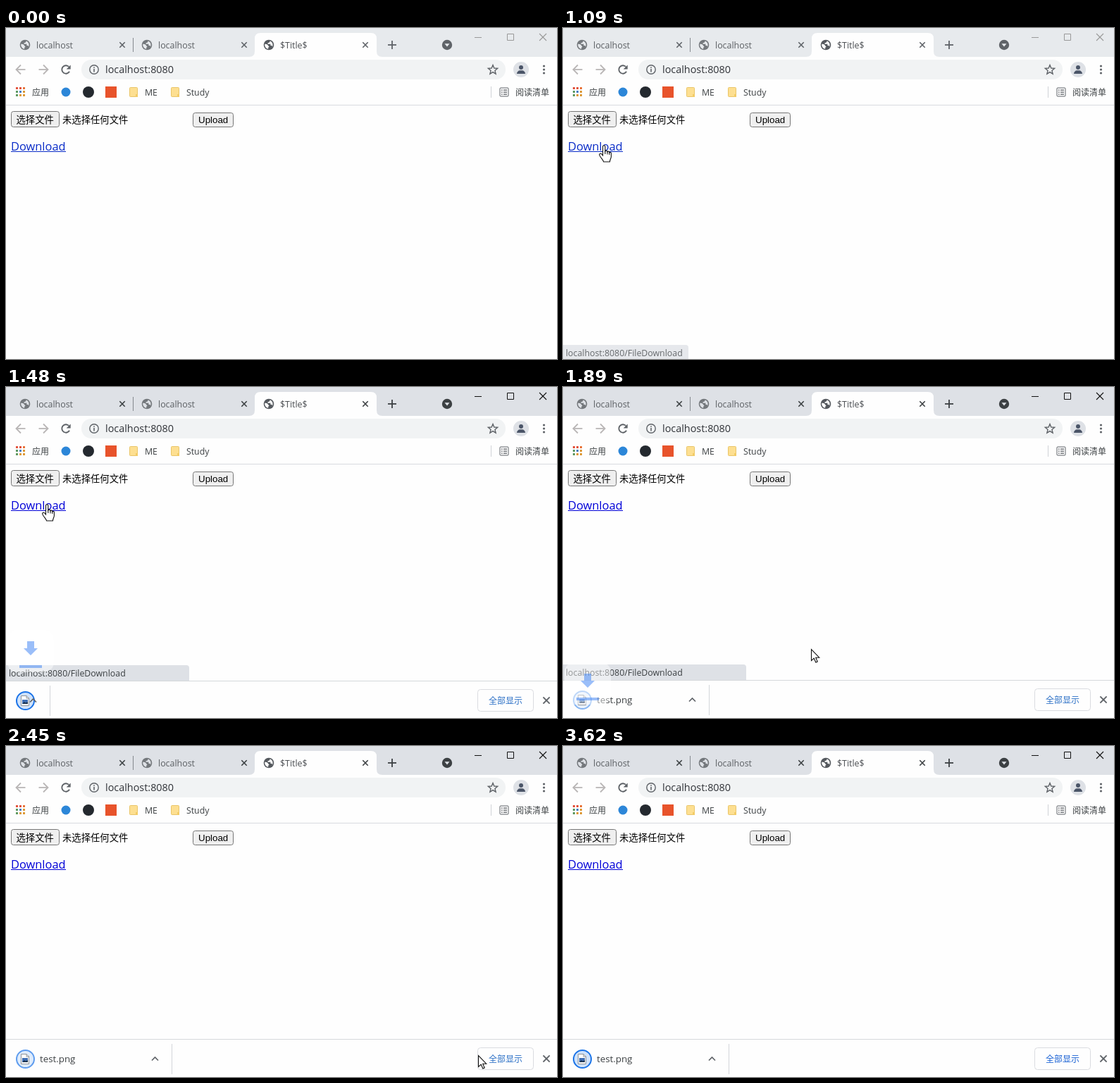
Recreate the animation shown at these times as an HTML page with a canvas. Size 782 by 470 pixels, loop 3760 ms.

```html
<!DOCTYPE html>
<html lang="zh-CN">
<head>
<meta charset="utf-8">
<title>Download</title>
<style>
html, body { margin: 0; width: 100%; height: 100%; overflow: hidden; background: #fefefe; }
canvas { display: block; width: 782px; height: 470px; }
</style>
</head>
<body>
<canvas id="stage" width="782" height="470"></canvas>
<script>
const ctx = document.getElementById('stage').getContext('2d');
const W = 782, H = 470, LOOP = 3760;
const UI = '"Open Sans", "Noto Sans CJK SC", "Noto Sans CJK", sans-serif';
const CJK = '"Noto Sans CJK SC", "Noto Sans CJK", sans-serif';
const FORM = '"Liberation Sans", "Noto Sans CJK SC", "Noto Sans CJK", sans-serif';
const PAPER = '#fefefe', GREY = '#5f6368', INK = '#3c4043';

// The screen is refreshed only at these moments.
const TICKS = [0, 200, 270, 340, 410, 480, 550, 620, 680, 750, 820, 890,
  1090, 1180, 1250, 1330, 1400, 1480, 1540,
  1630, 1690, 1760, 1830, 1890, 1960, 2030, 2100,
  2170, 2240, 2310, 2380, 2450, 2520, 2590, 2650,
  2720, 2780, 2840, 2910, 2980, 3050, 3270, 3340, 3410, 3480, 3550, 3620];

// Pointer: time, x, y
const POINTER = [[200, 508, 395], [340, 360, 330], [480, 205, 235], [620, 88, 162],
  [680, 69, 151], [750, 64, 160], [820, 60, 164], [890, 58, 166], [1540, 58, 166],
  [1630, 82, 186], [1760, 222, 303], [1890, 352, 372], [1960, 425, 387], [2030, 490, 385],
  [2100, 527, 381], [2310, 596, 408], [2520, 707, 455], [2590, 745, 480]];

const clamp = v => Math.max(0, Math.min(1, v));
const easeOut = v => 1 - (1 - clamp(v)) ** 2;

function rect(x, y, w, h, color) {
  ctx.fillStyle = color;
  ctx.fillRect(x, y, w, h);
}

function box(x, y, w, h, r, fill, stroke) {
  ctx.beginPath();
  ctx.roundRect(x, y, w, h, r);
  if (fill) { ctx.fillStyle = fill; ctx.fill(); }
  if (stroke) { ctx.strokeStyle = stroke; ctx.lineWidth = 1; ctx.stroke(); }
}

function disc(x, y, r, color) {
  ctx.beginPath();
  ctx.arc(x, y, r, 0, 7);
  ctx.fillStyle = color;
  ctx.fill();
}

function line(points, color, width = 1, close = false) {
  ctx.beginPath();
  points.forEach(([x, y]) => ctx.lineTo(x, y));
  if (close) ctx.closePath();
  ctx.strokeStyle = color;
  ctx.lineWidth = width;
  ctx.stroke();
}

function poly(points, color) {
  ctx.beginPath();
  points.forEach(([x, y]) => ctx.lineTo(x, y));
  ctx.fillStyle = color;
  ctx.fill();
}

function text(s, x, y, size, color = INK, family = UI) {
  ctx.font = `${size}px ${family}`;
  ctx.fillStyle = color;
  ctx.fillText(s, x, y);
}

function cross(x, y, r, color, width) {
  line([[x - r, y - r], [x + r, y + r]], color, width);
  line([[x - r, y + r], [x + r, y - r]], color, width);
}

function globe(x, y, color, back) {
  disc(x, y, 7.3, color);
  ctx.save();
  ctx.translate(x, y);
  ctx.fillStyle = back;
  ctx.fill(new Path2D('M-5.7-1.2C-3-1.5-1-.4-1 1.2C.8 1.6 .8 3.2-.8 3.6V5.7C-4 5.5-6.3 2-5.7-1.2Z'));
  ctx.fill(new Path2D('M1.5-5.6C1.5-3.6 .2-3.2-1.4-3V-1.2H2.4V1H4.4L5 2.8C6.6-.5 5-4.6 1.5-5.6Z'));
  ctx.restore();
}

function tab(x, label, active, strip) {
  const color = active ? '#55595e' : '#74787c';
  globe(x + 27, 24, color, active ? PAPER : strip);
  text(label, x + 43, 29, 12.4, active ? '#4a4d51' : '#5b5f63');
}

function tabStrip(focused) {
  const strip = focused ? '#dee1e6' : '#e7eaed';
  const tool = focused ? '#3c4043' : '#5f6368';
  const win = focused ? '#111' : '#999';
  rect(0, 0, W, 41, strip);
  ctx.fillStyle = PAPER;
  ctx.fill(new Path2D('M345 41Q353 41 353 33V15Q353 7 361 7H518Q526 7 526 15V33Q526 41 534 41Z'));
  rect(180, 14, 1, 20, '#85898e');
  tab(0, 'localhost', false, strip);
  tab(173, 'localhost', false, strip);
  tab(346, '$Title$', true, strip);
  for (const x of [165, 338, 510]) cross(x, 24, 3.7, tool, 1.6);
  line([[542, 24], [554, 24]], tool, 1.8);
  line([[548, 18], [548, 30]], tool, 1.8);
  disc(626, 24, 7.2, tool);
  poly([[622.5, 22.3], [629.5, 22.3], [626, 26.6]], strip);
  line([[665, 13.5], [675, 13.5]], win);
  line([[711.5, 8.5], [720.5, 8.5], [720.5, 17.5], [711.5, 17.5]], win, 1, true);
  cross(762, 13, 5, win, 1.1);
}

function navArrow(x, dir) {
  const c = '#b9b6b6';
  line([[x - 6.5 * dir, 59], [x + 6 * dir, 59]], c, 1.8);
  line([[x, 52.5], [x + 6.5 * dir, 59], [x, 65.5]], c, 1.8);
}

function toolbar() {
  rect(0, 41, W, 68, PAPER);
  navArrow(21, -1);
  navArrow(53, 1);
  ctx.beginPath();
  ctx.arc(85, 59, 5.7, .5, 5.5);
  ctx.strokeStyle = GREY;
  ctx.lineWidth = 1.9;
  ctx.stroke();
  poly([[91.7, 52.5], [91.7, 58.5], [85.7, 58.5]], GREY);

  box(107, 45, 602, 28, 14, '#f1f3f4');
  ctx.beginPath();
  ctx.arc(125, 59, 6.2, 0, 7);
  ctx.lineWidth = 1.4;
  ctx.stroke();
  rect(124.2, 58, 1.6, 4.5, GREY);
  rect(124.2, 55.3, 1.6, 1.6, GREY);
  text('localhost:8080', 141, 64, 14.4, '#303338');

  const star = [];
  for (let i = 0; i < 10; i++) {
    const a = -Math.PI / 2 + i * Math.PI / 5, r = i % 2 ? 3.1 : 7;
    star.push([691 + r * Math.cos(a), 59.5 + r * Math.sin(a)]);
  }
  line(star, GREY, 1.4, true);

  disc(731, 59, 11, '#dee1e6');
  disc(731, 56, 3, '#4b5568');
  box(725, 60.3, 12, 4.7, [5, 5, 0, 0], '#4b5568');
  for (const y of [54, 59, 64]) disc(763.5, y, 1.6, GREY);
}

function folder(x) {
  box(x + .5, 84.5, 11, 13, 1, '#fddf91', '#e9c569');
  rect(x + 9, 94, 3, 4, '#f3cc67');
}

function bookmarks() {
  const dots = ['#e2553f', '#e2553f', '#e8753a', '#5f9a62', '#4c7fc4', '#dd9a38', '#5f9a62', '#dd9a38', '#dd9a38'];
  dots.forEach((c, i) => rect(14 + i % 3 * 5, 84 + Math.floor(i / 3) * 5, 3, 3, c));
  text('应用', 37, 96, 12, INK, CJK);
  disc(85, 91, 6.5, '#2c86d8');
  disc(117, 91, 8, '#24292f');
  rect(141, 83, 16, 16, '#e8532b');
  folder(175);
  text('ME', 197, 96, 12.3);
  folder(234);
  text('Study', 256, 96, 12.3);
  rect(688, 83, 1, 16, '#d0d3d7');
  box(701, 85, 12, 12, 1, null, GREY);
  for (const y of [88, 91, 94]) {
    rect(703, y - .5, 1.6, 1.3, GREY);
    rect(706, y - .5, 5, 1.3, GREY);
  }
  text('阅读清单', 723, 96, 12, INK, CJK);
  rect(0, 109, W, 1, '#d8dbdf');
}

function page(clicked) {
  box(7.5, 118.5, 68, 22, 3, '#efefef', '#767676');
  text('选择文件', 14.5, 135, 13.33, '#000', FORM);
  text('未选择任何文件', 80, 135, 13.33, '#000', FORM);
  box(265.5, 120.5, 57, 20, 3, '#efefef', '#767676');
  text('Upload', 273, 135, 13.33, '#000', FORM);
  const link = clicked ? '#0000d8' : '#0a2cc8';
  text('Download', 7, 174, 16.4, link);
  rect(7, 175, 78, 1, link);
}

function fileIcon(x, y) {
  poly([[x, y], [x + 8, y], [x + 12, y + 4], [x + 12, y + 15], [x, y + 15]], '#fff');
  line([[x + .5, y + .5], [x + 8, y + .5], [x + 11.5, y + 4], [x + 11.5, y + 14.5], [x + .5, y + 14.5]], '#8d9298', 1, true);
  line([[x + 8, y], [x + 8, y + 4], [x + 12, y + 4]], '#8d9298');
  rect(x + 2, y + 6, 8, 6, '#3f6fb5');
  poly([[x + 2, y + 12], [x + 5, y + 9], [x + 7, y + 10.5], [x + 10, y + 9], [x + 10, y + 12]], '#1f3550');
}

function shelf(t, top) {
  rect(0, top, W, H - top, PAPER);
  rect(0, top, W, 1, '#d5d8db');
  ctx.save();
  ctx.translate(0, top - 416);

  const sep = Math.round(235 * easeOut((t - 1367) / 800));
  const glow = t < 1640 ? 1 : .5 + .5 * Math.cos((t - 1640) / 500 * Math.PI);
  ctx.globalAlpha = glow;
  disc(27.5, 444.5, 12.5, '#cfe2fb');
  ctx.beginPath();
  ctx.arc(27.5, 444.5, 12.5, 0, 7);
  ctx.strokeStyle = '#1a73e8';
  ctx.lineWidth = 2;
  ctx.stroke();
  ctx.globalAlpha = 1;
  fileIcon(21, 437);

  ctx.save();
  ctx.beginPath();
  ctx.rect(0, 416, Math.max(0, sep - 45), 60);
  ctx.clip();
  text('test.png', 48, 449, 13.3);
  ctx.restore();

  line([[sep - 28, 446.5], [sep - 23.5, 442], [sep - 19, 446.5]], GREY, 1.7);
  rect(sep, 423, 1, 43, '#d3d6da');
  box(669.5, 428.5, 79, 31, 4, PAPER, '#dadce0');
  text('全部显示', 685, 449, 12, t < 2720 ? '#2c70c6' : '#1a62d4', CJK);
  cross(767, 444, 4.6, GREY, 1.9);
  ctx.restore();
}

function statusBubble(t, bottom) {
  ctx.globalAlpha = t < 1090 ? 0 : Math.min(clamp((t - 1000) / 120), clamp(1 - (t - 1960) / 187));
  box(0, bottom - 22, t > 1367 ? 260 : 178, 22, [0, 4, 0, 0], '#dee1e6');
  text('localhost:8080/FileDownload', 4, bottom - 6, 12.35);
  ctx.globalAlpha = 1;
}

// Large arrow that sinks towards the shelf, fading in and out.
function fallingArrow(t) {
  const v = (t - 1385) / 600;
  if (v <= 0 || v >= 1) return;
  const y = 386.3 + 67.3 * v;
  ctx.globalAlpha = 1 - 4 * (v - .5) ** 2;
  box(2, y - 52, 66, 60, 14, 'rgba(255,255,255,.85)');
  poly([[30, y - 36], [40, y - 36], [40, y - 26], [45, y - 26], [35, y - 16], [25, y - 26], [30, y - 26]], '#4285f4');
  rect(19, y - 2, 32, 4, '#4285f4');
  ctx.globalAlpha = 1;
}

const ARROW = new Path2D('M.5 .5V16.5L4.2 13.2L6.8 19L9.2 18L6.7 12.2H11.7Z');
const HAND = new Path2D('M5.5 15V2.5C5.5 .1 8.8 .1 8.8 2.5V9C9.6 7.6 12 8 12 9.8C13 8.6 14.8 9.2 14.8 10.8C15.8 9.8 17.4 10.6 17.4 12V16.5C17.4 19 15.8 20 15.4 24H6.6C6 21 2.5 18.5 .8 14.6C0 12.6 2.4 11.6 3.8 13Z');
const KNUCKLES = new Path2D('M8.8 9V13M12 9.8V13.5M14.8 10.8V14');

function pointer(t) {
  const i = POINTER.findIndex(p => p[0] >= t);
  if (i < 0 || t < POINTER[0][0]) return;
  const b = POINTER[i], a = POINTER[i - 1] || b;
  const k = b === a ? 0 : (t - a[0]) / (b[0] - a[0]);
  const x = Math.round(a[1] + (b[1] - a[1]) * k);
  const y = Math.round(a[2] + (b[2] - a[2]) * k);
  const onLink = x < 86 && y > 158 && y < 178;
  const shape = onLink ? HAND : ARROW;
  ctx.save();
  ctx.translate(onLink ? x - 7 : x, y);
  ctx.fillStyle = '#fff';
  ctx.fill(shape);
  ctx.strokeStyle = '#111';
  ctx.lineWidth = 1.1;
  ctx.stroke(shape);
  if (onLink) ctx.stroke(KNUCKLES);
  ctx.restore();
}

function draw(t) {
  const clicked = t >= 1180;
  const bottom = Math.round(472 - 56 * easeOut((t - 1367) / 130));
  rect(0, 0, W, H, PAPER);
  tabStrip(clicked);
  toolbar();
  bookmarks();
  page(clicked);
  statusBubble(t, bottom);
  if (t > 1367) shelf(t, bottom);
  fallingArrow(t);
  pointer(t);
}

const start = performance.now();
function tick() {
  const t = (performance.now() - start) % LOOP;
  draw(TICKS.findLast(k => k <= t) || 0);
  requestAnimationFrame(tick);
}
tick();
</script>
</body>
</html>
```
